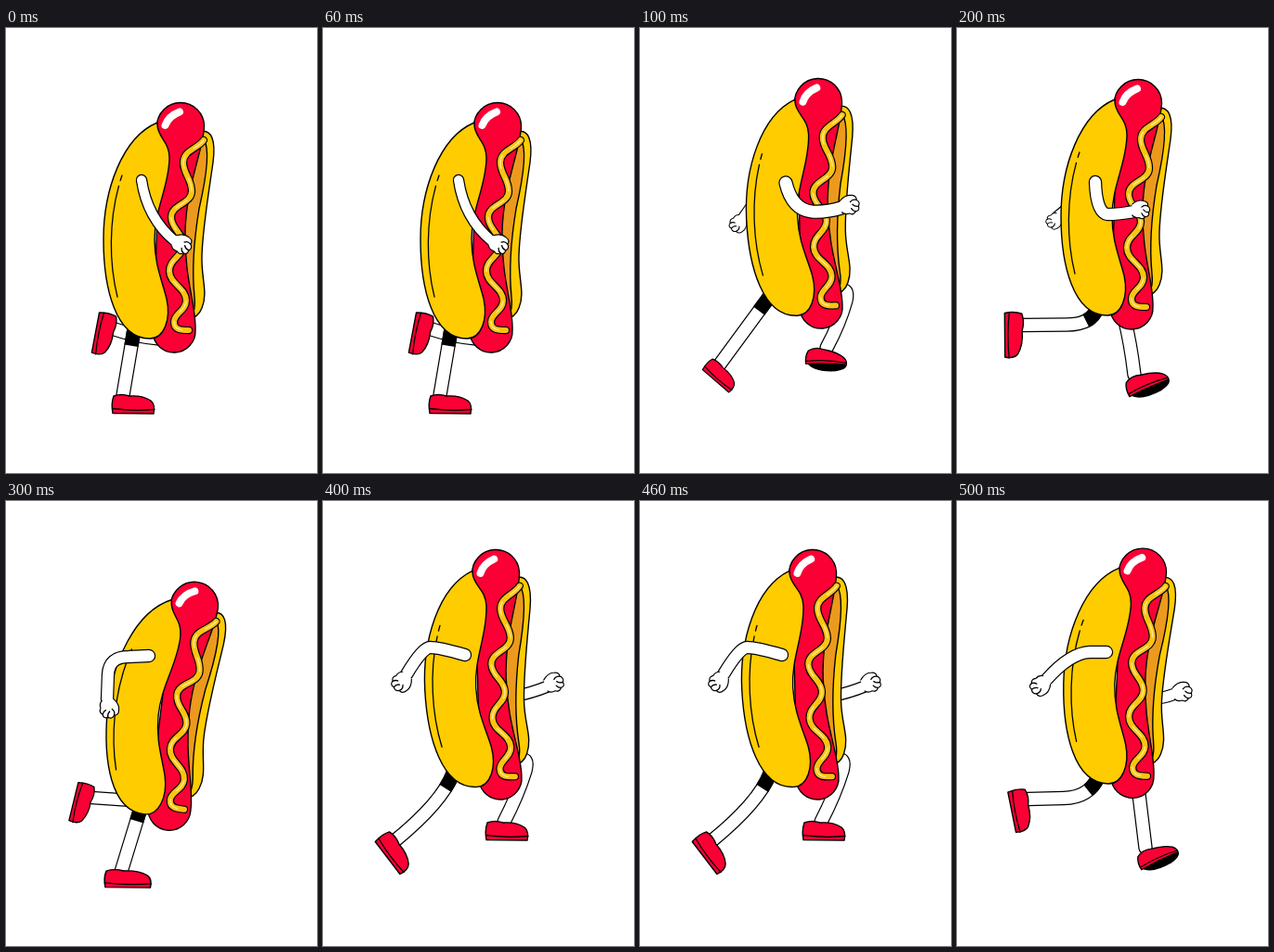
These frames come from a looping animation (335x480 px, 0.6 s). An HTML page:

```html
<!DOCTYPE html>
<html lang="en">
<head>
<meta charset="utf-8">
<title>Running hot dog</title>
<style>
  html, body { margin: 0; width: 100%; height: 100%; overflow: hidden; background: #fff; }
  svg { display: block; width: 100vw; height: 100vh; }
  path { stroke-linejoin: round; }
  .line { fill: none; stroke: #000; stroke-width: 1.3; stroke-linecap: round; }
  .red, .yellow, .orange, .hand { stroke: #000; stroke-width: 1.4; }
  .red { fill: #fb0035; }
  .yellow { fill: #fc0; }
  .orange { fill: #eb9a1e; }
  .hand { fill: #fff; stroke-width: 1.2; }
  .tube { fill: none; stroke-linecap: round; }
  #strip { animation: run .6s steps(6) infinite; }
  @keyframes run { to { transform: translateX(-2010px); } }
</style>
</head>
<body>
<svg viewBox="0 0 335 480" preserveAspectRatio="none">
  <defs>
    <g id="body">
      <path class="yellow" d="M208 112C222 108 226 122 223 145C218 180 212 215 211 245C210 270 218 285 211 302C208 310 202 313 200 312L190 300L195 150Z"/>
      <path class="orange" d="M213 120C220 130 216 160 208 195C203 225 200 260 203 290Q204 300 202 306L185 300L190 160Z"/>
      <path class="red" d="M162.500 106A25.500 25.500 0 0 1 213.500 106C213 130 194 170 193 220C192 270 205 300 204 326A23 23 0 0 1 158 328L160 300L165 130Z"/>
      <path class="tube" stroke="#fff" stroke-width="8" d="M171.500 105Q175 95 187 90.500"/>
      <g id="mustard"></g>
      <path class="yellow" d="M163 102C125 118 105 175 105 228C105 280 118 335 155 335C170 335 178 315 173 292C168 272 160 255 160 228C160 195 176 170 176 140C176 122 163 118 163 104Z"/>
      <path class="line" stroke-dasharray="6 6 130" d="M125 159C111 200 110 250 120 290"/>
    </g>
    <g id="shoe">
      <path class="red" d="M-9 0Q-1 -3 8 0Q22 -1 31 5Q36 9 34 19L-10 18.500Q-12 8 -9 0Z"/>
      <path class="line" d="M-10.500 13.500Q12 16.500 35 14.500"/>
    </g>
    <g id="lifted">
      <path d="M-12 13Q10 10 34 15Q37 22 22 24.500Q-6 26 -12 13Z"/>
      <path class="red" d="M-9 1Q-1 -4 9 0Q24 3 31 9Q35 13 34 17Q12 15 -12 16Q-13 7 -9 1Z"/>
      <path class="line" d="M-12 13Q12 11 34 15"/>
    </g>
    <g id="fist">
      <path class="hand" d="M-9 -6Q-2 -12 4 -10Q10 -9 9 -4Q13 -1 10 3Q11 8 6 8Q3 12 -1 9Q-6 10 -9 6"/>
      <path class="line" d="M9 -4Q5 -6 2 -3M10 3Q6 3 4 0M6 8Q3 7 2 4"/>
    </g>
  </defs>
  <g id="strip"></g>
</svg>
<script>
const tube = (d, w, color = '#fff', edge = 1.2) =>
  `<path class="tube" d="${d}" stroke="#000" stroke-width="${w + edge * 2}"/>` +
  `<path class="tube" d="${d}" stroke="${color}" stroke-width="${w}"/>`;

const place = (id, [x, y, turn = 0, sx = 1, sy = sx]) =>
  `<use href="#${id}" transform="translate(${x} ${y}) rotate(${turn}) scale(${sx} ${sy})"/>`;

const arm = a => a ? tube(a.d, a.w || 11) + place('fist', a.hand) : '';

const leg = l => tube(l.d, l.w || 13) +
  (l.band ? `<path fill="none" stroke="#000" stroke-width="15.400" stroke-dasharray="${l.band} 999" d="${l.d}"/>` : '') +
  place(l.lifted ? 'lifted' : 'shoe', l.foot);

// at: middle of the body, tilt: degrees from the drawn pose
const poses = [
  {
    at: [184.5, 216], tilt: 0,
    farLeg: { d: 'M165 335Q140 333 114 324', foot: [117, 320, 100] },
    nearLeg: { d: 'M138 325L126 396', band: 18, foot: [125, 397] },
    nearArm: { d: 'M146 164Q152 205 182 230', w: 10, hand: [189, 233, 25] }
  },
  {
    at: [193.5, 190], tilt: -2.6,
    farArm: { d: 'M122 190L110 207', hand: [106, 211, 130, .88] },
    farLeg: { d: 'M205 290L216 284Q225 280 222 294Q215 319 201 345', foot: [190, 347, 0, .95], lifted: true },
    nearLeg: { d: 'M140 289L85 364', band: 20, foot: [84, 362, 40, .85] },
    nearArm: { d: 'M157 167Q164 196 185 198Q200 199 217 194', w: 13, hand: [225, 191, -10] }
  },
  {
    at: [191.5, 191], tilt: 0,
    farArm: { d: 'M120 194L108 204', hand: [105, 208, 140, .8] },
    farLeg: { d: 'M180 312Q187 340 191 374', foot: [190, 378, -25], lifted: true },
    nearLeg: { d: 'M151 302Q145 320 118 320L70 320.500', band: 19, foot: [70, 318, 89, 1.08, 1] },
    nearArm: { d: 'M149 166Q150 199 162 201Q175 201 191 198', w: 12, hand: [197, 196, 0, .95] }
  },
  {
    at: [189.5, 222], tilt: 5.2,
    farLeg: { d: 'M150 324L92 320', w: 12, foot: [93, 317, 103, .96] },
    nearLeg: { d: 'M146 328L124 400', band: 18, foot: [118, 399, 0, 1.1, .95] },
    nearArm: { d: 'M154 167L132 168Q111 168 110 187L109 214', w: 12, hand: [111, 223, 80] }
  },
  {
    at: [188.5, 188], tilt: -3.1,
    farArm: { d: 'M205 211Q225 207 242 200', hand: [248, 196, -20] },
    farLeg: { d: 'M200 285L212 280Q222 276 218 291Q210 317 195 346', foot: [186, 347] },
    nearLeg: { d: 'M140 294Q128 325 78 366', band: 18, foot: [77, 364, 52] },
    nearArm: { d: 'M153 166Q125 158 116 158Q108 157 90 187', w: 12, hand: [85, 195, 130] }
  },
  {
    at: [194.5, 186.5], tilt: 1.05,
    farArm: { d: 'M207 214Q222 213 235 208', hand: [242, 206, -10] },
    farLeg: { d: 'M195 308Q199 340 203 374', foot: [202, 379, -27, .95], lifted: true },
    nearLeg: { d: 'M152 298Q142 320 115 320.500L76 321.500', band: 18, foot: [75, 320, 78] },
    nearArm: { d: 'M161 163L143 163Q122 164 97 192', w: 12, hand: [90, 199, 140] }
  }
];

const wave = 'M213 121C207 130 191 132 191 145C191 157 200 163 200 176C200 190 178 190 178 204' +
  'C178 217 191 221 191 234C191 246 176 249 176 262C176 276 194 280 194 294' +
  'C194 305 181 308 181 317C181 326 189 326 197 326';
document.getElementById('mustard').innerHTML = tube(wave, 6, '#fcc312') +
  `<path class="tube" d="${wave}" stroke="#ffe58a" stroke-width="1.600" stroke-dasharray="14 12"/>`;

document.getElementById('strip').innerHTML = poses.map((p, i) => {
  const [x, y] = p.at;
  return `<g transform="translate(${i * 335} 0)">` +
    arm(p.farArm) + leg(p.farLeg) + leg(p.nearLeg) +
    `<use href="#body" transform="translate(${x} ${y}) rotate(${p.tilt}) translate(-184.500 -216)"/>` +
    arm(p.nearArm) + '</g>';
}).join('');
</script>
</body>
</html>
```
